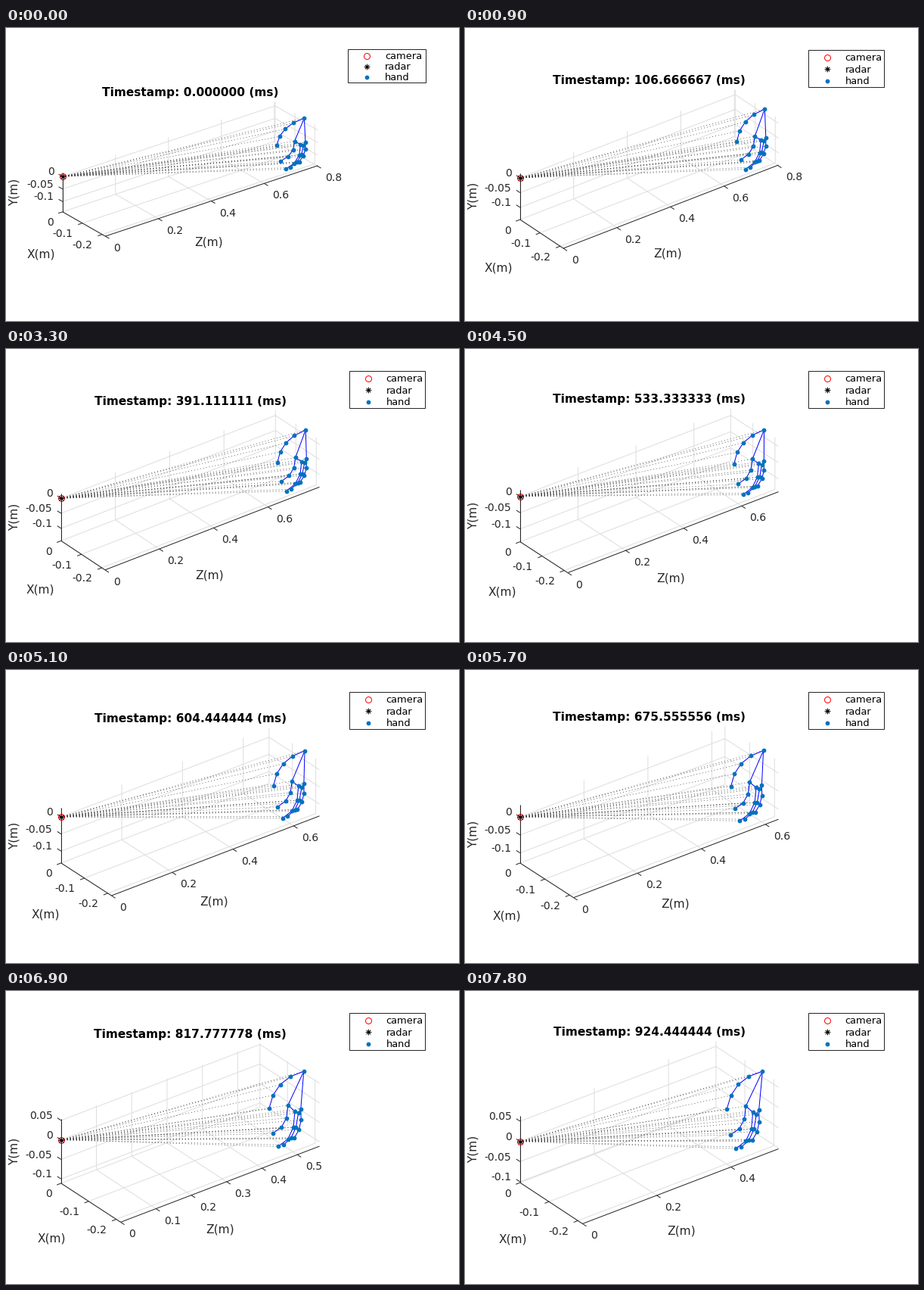
Animation of 599x387 px, one loop 8000 ms. Source, as a matplotlib script:

```python
import numpy as np
import matplotlib.pyplot as plt
from matplotlib.animation import FuncAnimation
from matplotlib.collections import LineCollection
from matplotlib.patches import Rectangle

W, H = 599, 387
STEPS = 27
MS_PER_STEP = 320 / 9
X_MIN = -0.216
INK = (0.15, 0.15, 0.15)
GRID = (0.87, 0.87, 0.87)
DOT = (0, 0.447, 0.741)
TICK_SIZE, LABEL_SIZE, LEGEND_SIZE = 14, 15.4, 13

plt.rcParams["font.family"] = "DejaVu Sans"
plt.rcParams["lines.scale_dashes"] = False

# Each finger is a quadratic curve: base, control point, tip
WRIST = np.array([397, 107])
THUMB = [WRIST, (364, 119.5), (360, 150)]
FINGERS = [[(384, 143), (384, 165), (365.5, 174)],
           [(392, 148), (393, 175.6), (372, 186.5)],
           [(396, 149), (394, 174), (378, 184)],
           [(398.5, 144.5), (400.5, 162.5), (390, 175)]]

fig = plt.figure(figsize=(W / 72, H / 72), dpi=72, facecolor="white")
ax = fig.add_axes([0, 0, 1, 1])


def progress(step):
    """Ease of the hand coming nearer, from 0 (still) to nearly 1."""
    u = np.clip((step - 8.5) / 19, 0, 1)
    return u * u * (3 - 2 * u)


def curve(points, count):
    a, b, c = (np.array(p, float) for p in points)
    t = np.linspace(0, 1, count)[:, None]
    return (1 - t)**2 * a + 2 * t * (1 - t) * b + t**2 * c


def hand_chains(p):
    """Polylines of the hand: thumb, four fingers, then the palm outline."""
    drift = np.array([[0.2, 0.22], [-0.07, 0.36]])

    def move(points):
        return points + p * ((points - WRIST) @ drift - [3, 1])

    thumb = move(curve(THUMB, 5))
    fade = np.linspace(1, 0, 4)[:, None] * [-4, 0]
    fingers = [move(curve(f, 4)) + p * fade for f in FINGERS]
    palm = np.array([thumb[0], *(f[0] for f in fingers), thumb[0]])
    return [thumb, *fingers, palm]


def ticks(low, high, step):
    first, last = np.ceil(low / step - 0.02), np.floor(high / step + 0.002)
    return np.arange(first, last + 1) * step


def unit(v):
    return v / np.hypot(*v)


def text(x, y, s, size, color=INK, **kw):
    """Text whose capitals are centred vertically near y."""
    ax.text(x, y + 0.3 * size, s, size=size, color=color, va="baseline", **kw)


def segments(lines, color):
    ax.add_collection(LineCollection(lines, colors=[color], linewidths=1))


def camera(x, y):
    ax.plot(x, y, "o", ms=8, mfc="none", mec="red", mew=1)


def radar(x, y):
    ax.plot(x, y, marker=(8, 2, 0), ms=7.5, mec="black", mew=0.8, ls="none")


def hand_dots(x, y):
    ax.plot(x, y, "o", ms=5.8, mfc=DOT, mec="none")


def draw_legend(x, y, width, height):
    ax.add_patch(Rectangle((x, y), width, height, fc="white", ec=INK, lw=1))
    entries = (("camera", camera), ("radar", radar), ("hand", hand_dots))
    for i, (name, marker) in enumerate(entries):
        row = y + height * (0.2 + 0.315 * i)
        marker(x + 25, row)
        text(x + 48.7, row + 0.6, name, LEGEND_SIZE, "black")


def draw(frame):
    step = min(frame // 3, STEPS - 1)
    p = progress(step)
    sag = p * (1 - p)

    # Corners of the axes box: left, front and right floor corners
    a = np.array([73.5, 253 + 8 * sag])
    b = np.array([130.7 + 20 * p + 6 * p * p, 291 + 16.7 * p])
    c = np.array([415.2, 181 + 28 * p])
    origin = np.array([73.5, 198 + p - 18 * sag])
    chains = hand_chains(p)
    height = 61.5 + 27 * p
    scale = (19.5 + 7.3 * p) / 0.05
    z_max = 0.803 - 0.28 * p
    drop = 1

    if step == 0:  # the opening layout is flatter
        squash, drop = 0.848, 0.88

        def flatten(v):
            return (v - [73.5, 107]) * [0.988, squash] + [75.5, 119]

        a, b, c, origin = map(flatten, (a, b, c, origin))
        chains = [flatten(chain) for chain in chains]
        height *= squash
        scale *= squash

    x_dir, z_dir = b - a, c - b
    y_min = (origin[1] - a[1]) / scale
    y_max = y_min + height / scale

    def project(x, y, z):
        return origin + x / X_MIN * x_dir + z / z_max * z_dir - [0, y * scale]

    ax.clear()
    ax.set(xlim=(0.7, W + 0.7), ylim=(H, 0))
    ax.axis("off")

    xs = -ticks(0, -X_MIN, 0.1)
    ys = ticks(y_min, y_max, 0.05)
    zs = ticks(0, z_max, 0.1 if 0.54 < z_max < 0.6 else 0.2)

    # Grid lines bend once where the floor and walls meet
    segments(
        [[project(x, y_min, 0), project(x, y_min, z_max),
          project(x, y_max, z_max)] for x in xs]
        + [[project(0, y, 0), project(0, y, z_max),
            project(X_MIN, y, z_max)] for y in ys]
        + [[project(X_MIN, y_min, z), project(0, y_min, z),
            project(0, y_max, z)] for z in zs], GRID)

    axes = [[b, a], [b, c], [a, a - [0, height]]]

    def add_tick(value, q, out, dx, dy, align):
        axes.append([q, q + 6 * out])
        text(q[0] + dx, q[1] + dy, f"{value + 0:.2g}", TICK_SIZE, ha=align)

    for x in xs:
        add_tick(x, project(x, y_min, 0), -unit(z_dir), -12.3, 14.3, "right")
    for y in ys:
        add_tick(y, project(0, y, 0), -unit(x_dir), -11.3, -6, "right")
    for z in zs:
        add_tick(z, project(X_MIN, y_min, z), unit(x_dir), 10.7, 15.8, "left")
    segments(axes, INK)

    x_mid, z_mid = (a + b) / 2, (b + c) / 2
    text(x_mid[0] - 57 + 6.5 * p, x_mid[1] + (45 + 3 * p) * drop, "X(m)",
         LABEL_SIZE, ha="center")
    text(z_mid[0] - 4 + 5 * p, z_mid[1] + (62 - 3 * p) * drop, "Z(m)",
         LABEL_SIZE, ha="center")
    ax.text(11.5, a[1] - height / 2, "Y(m)", size=LABEL_SIZE, color=INK,
            rotation=90, ha="center", va="center")
    title_y = project(0, y_max, z_max)[1] - 12
    text(244.5, title_y, f"Timestamp: {step * MS_PER_STEP:.6f} (ms)",
         LABEL_SIZE, "black", ha="center", weight="bold")

    joints = np.vstack(chains[:-1])
    for joint in joints:
        ax.plot(*zip(origin, joint), color="0.25", lw=0.75, dashes=(1, 3),
                dash_capstyle="butt")
    for chain in chains:
        ax.plot(*chain.T, color="blue", lw=1)
    hand_dots(*joints.T)
    camera(*origin)
    radar(*origin)
    if step == 0:
        draw_legend(452.9, 28, 103, 44)
    else:
        draw_legend(454.5, 29, 100, 49)
    return []


anim = FuncAnimation(fig, draw, frames=80, interval=100, repeat=True,
                     repeat_delay=0, init_func=lambda: draw(0))
plt.show()
```
